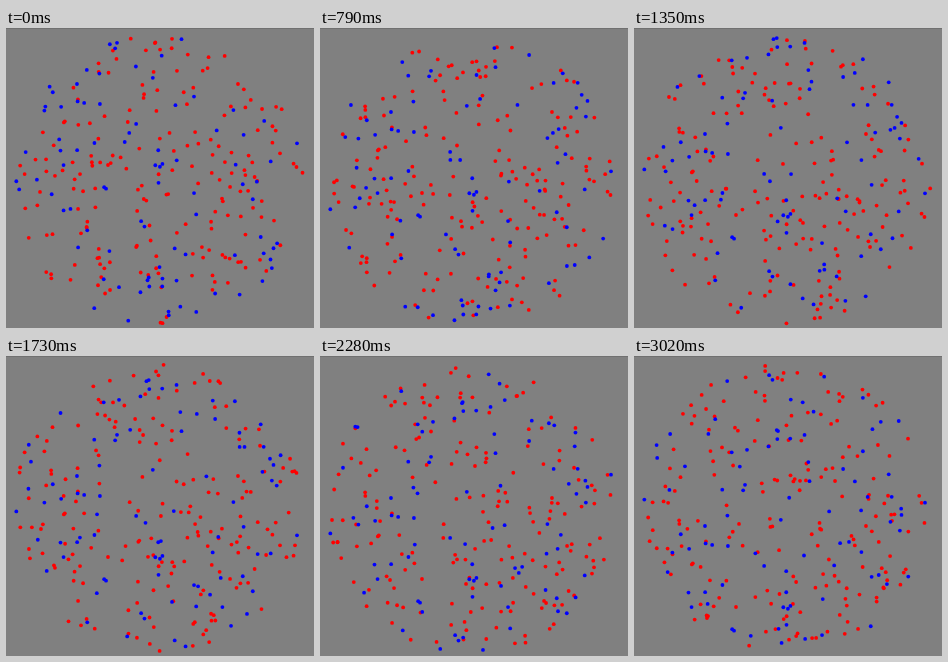
Recreate the animation shown at these times as an HTML page with a canvas. Size 308 by 300 pixels, loop 3070 ms.

```html
<!DOCTYPE html>
<html>
<head>
<meta charset="utf-8">
<style>
html, body { margin: 0; width: 100%; height: 100%; overflow: hidden; background: #808080; }
canvas { display: block; }
</style>
</head>
<body>
<canvas id="stage" width="308" height="300"></canvas>
<script>
const ctx = document.getElementById('stage').getContext('2d');
const LOOP = 3070, STEP_MS = 53, STEP_PX = 2;
const CX = 152, CY = 153, R = 145, DOT = 1.9;
const TURN = 2 * Math.PI, DOWN = Math.PI / 2;

let seed = 20117;
function rnd() {
  seed = (seed * 48271) % 2147483647;
  return seed / 2147483647;
}

// Each dot keeps one heading; it is stored as a position along that heading
// and an offset across it. A share of the dots all drift straight down.
function scatter(count, color, coherence) {
  return Array.from({ length: count }, () => {
    const r = R * Math.sqrt(rnd()), place = rnd() * TURN;
    const heading = rnd() < coherence ? DOWN : rnd() * TURN;
    const across = r * Math.sin(place - heading);
    return {
      color, across,
      along: r * Math.cos(place - heading),
      half: Math.sqrt(R * R - across * across),
      c: Math.cos(heading),
      s: Math.sin(heading)
    };
  });
}

const dots = [...scatter(185, '#f00', 0.4), ...scatter(88, '#00f', 0.6)];

function draw(now) {
  const dist = Math.floor((now % LOOP) / STEP_MS) * STEP_PX;
  ctx.fillStyle = '#808080';
  ctx.fillRect(0, 0, 308, 300);
  ctx.fillStyle = '#707070';
  ctx.fillRect(0, 0, 308, 1);
  for (const { color, across, along, half, c, s } of dots) {
    // Leaving the disc means re-entering on its far side
    const u = (along + dist + half) % (2 * half) - half;
    ctx.fillStyle = color;
    ctx.beginPath();
    ctx.arc(CX + u * c - across * s, CY + u * s + across * c, DOT, 0, TURN);
    ctx.fill();
  }
  requestAnimationFrame(draw);
}
requestAnimationFrame(draw);
</script>
</body>
</html>
```
